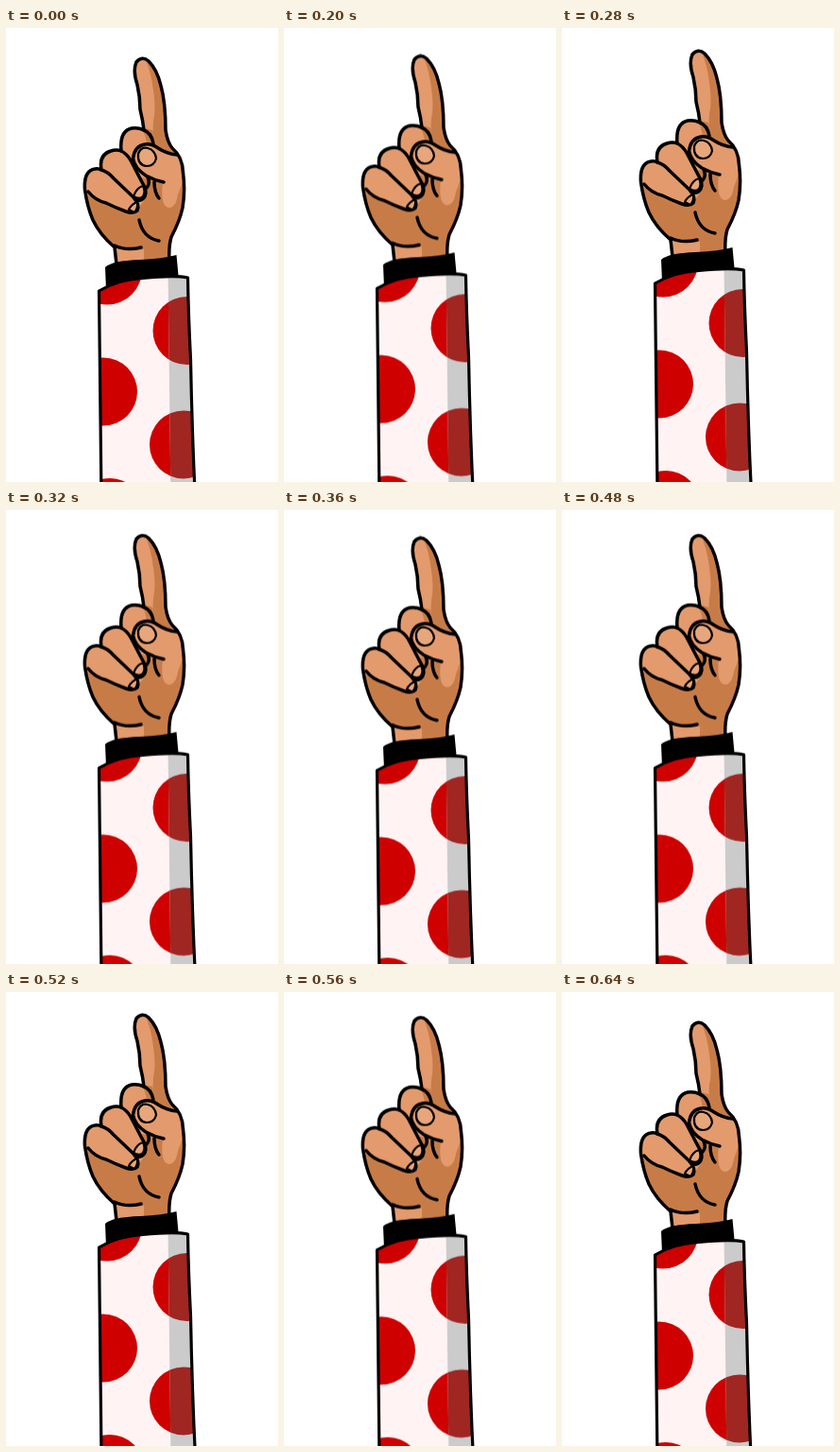
An HTML page without scripts that plays this animation: 288 px wide and 480 px high, repeating every 1.2 s.

```html
<!DOCTYPE html>
<html lang="en">
<head>
<meta charset="utf-8">
<title>Pointing hand</title>
<style>
html, body { margin: 0; width: 100%; height: 100%; overflow: hidden; background: #fff; }
svg { display: block; width: 100vw; height: 100vh; }
.arm { animation: bob 1.2s steps(3, end) infinite; }
.line { fill: none; stroke: #000; stroke-width: 3.5; stroke-linecap: round; stroke-linejoin: round; }
.thin { stroke-width: 2.2; }
.skin { fill: #e39a6d; }
.shade { fill: #c77c48; }
.nail { fill: #e8a67c; }
@keyframes bob {
  0%, 13.333%, 33.333%, 53.333%, 100% { transform: translateY(0); }
  23.333%, 43.333% { transform: translateY(-8px); }
}
</style>
</head>
<body>
<svg viewBox="0 0 288 480">
  <defs>
    <path id="sleeve" d="M98.5 278Q118 266 145 264.5Q178 261 192.5 264Q193 300 195.5 350Q197 430 200.5 500H101Q100 380 98.5 278Z"/>
    <path id="hand" d="M117 250L115 232Q99 218 92 203Q86 189 83.5 171Q82 151 94 149Q98 148 101 150Q98 134 111 130Q117 128 122 130Q120 109 133 106Q140 105 146 108Q145 98 142 86Q142 73 139 60Q134 45 138 36Q144 29 151 35Q160 44 164 61Q169 79 169 108Q171 121 176 127Q187 136 187.5 153Q190 172 187 190Q184 204 175 221Q172 231 173 248Z"/>
    <clipPath id="in-sleeve"><use href="#sleeve"/></clipPath>
    <clipPath id="in-hand"><use href="#hand"/></clipPath>
    <clipPath id="in-shade"><path d="M171.5 255L174.5 500H210V255Z"/></clipPath>
    <g id="dots">
      <circle cx="107" cy="255.500" r="37"/>
      <circle cx="103" cy="384.500" r="36"/>
      <circle cx="191.500" cy="320" r="36"/>
      <circle cx="188" cy="440.500" r="36"/>
      <circle cx="110" cy="512" r="36"/>
    </g>
  </defs>
  <g class="arm">
    <use href="#hand" class="skin"/>
    <g clip-path="url(#in-hand)" class="shade">
      <path d="M80 170Q91 182 110 188L133 196Q143 190 148 178L142 158L152 159L166 163Q163 188 172 190Q180 190 182 176L192 150V200L174 222L176 252H146V234Q126 236 112 230Q90 220 80 170Z"/>
      <path d="M145 28Q153 42 156 66Q159 86 156 98L155 120L162 128L177 132V100L166 50Z"/>
      <path d="M143 105Q148 113 149 123L157 126L155 108Z"/>
    </g>
    <use href="#hand" class="line"/>
    <path class="line" d="M146 108Q154 111 156 122M122 130Q128 133 132 140L144 163Q150 172 147 178Q144 183 139 182M101 150Q108 152 114 159L135 179Q142 187 139 193Q135 197 127 194Q116 190 106 185Q94 182 87 173M141 203Q145 222 162 225M115 230Q127 236 143 232M157 163Q157 174 162 180M150 158Q153 164 149 169"/>
    <path class="line skin" d="M181 134Q170 133 161 127Q154 122 147 123Q136 125 134.500 138Q136 148 148 156Q157 161 167 163"/>
    <path class="line thin nail" d="M140 133Q143 125 150 127Q158 129 159 138Q157 146 149 146Q139 145 140 133Z"/>
    <path class="line thin nail" d="M135 178Q138 169 145 167Q148 173 145 178Q141 182 135 178Z"/>
    <path class="line thin nail" d="M130 192Q133 186 139 184Q140 190 136 195Z"/>
    <path d="M105 253Q112 246 142 245Q166 244 180.500 240L183 267L106 277Z"/>
    <use href="#sleeve" fill="#fff3f3"/>
    <g clip-path="url(#in-sleeve)">
      <use href="#dots" fill="#cf0000"/>
      <g clip-path="url(#in-shade)">
        <path d="M160 250H215V510H160Z" fill="#cbcbcb"/>
        <use href="#dots" fill="#a02622"/>
      </g>
    </g>
    <use href="#sleeve" class="line" style="stroke-width:3.2"/>
  </g>
</svg>
</body>
</html>
```
